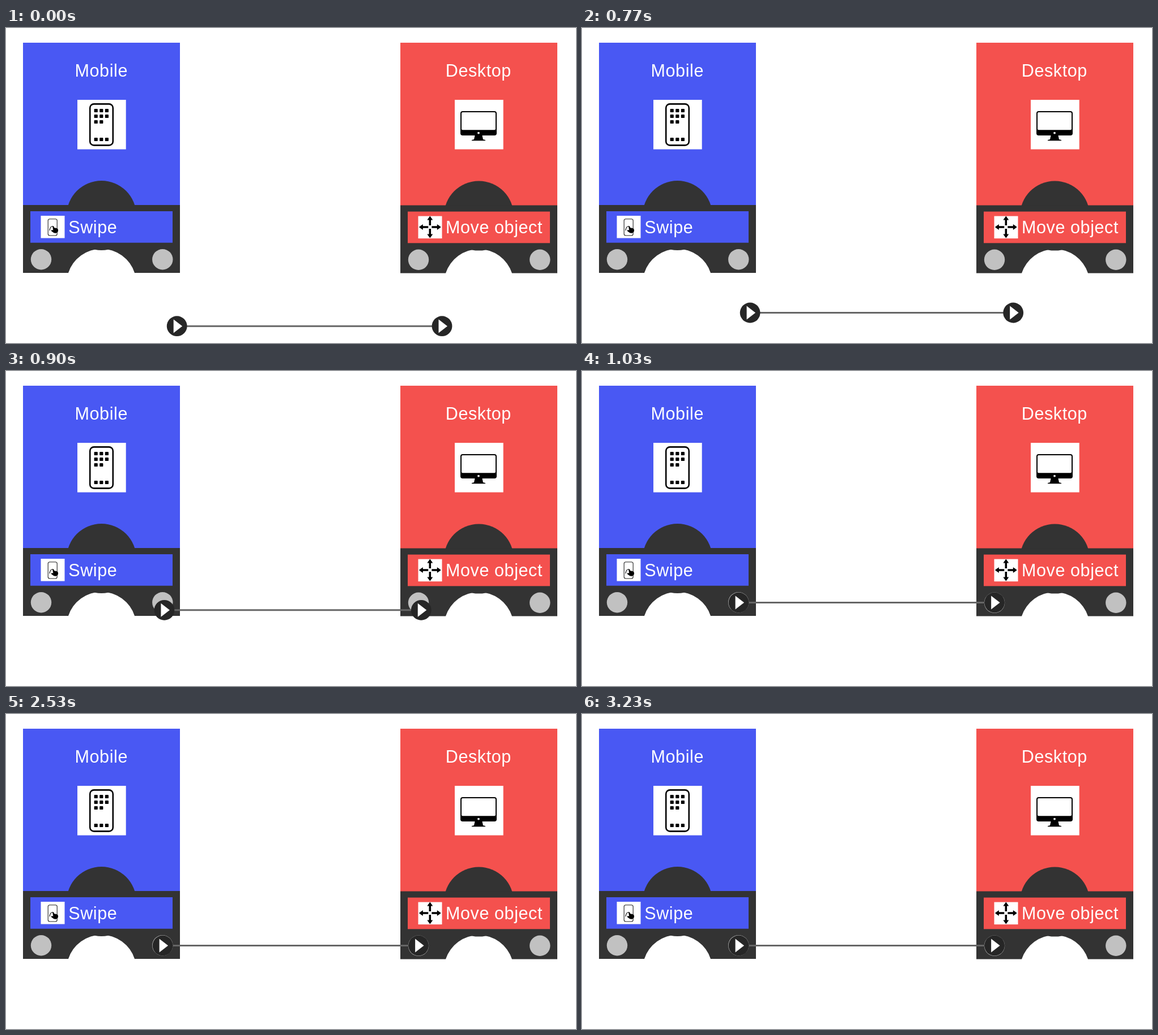
Recreate the animation shown at these times as an HTML page. Size 1006 by 557 pixels, loop 3.33 s.

```html
<!DOCTYPE html>
<html lang="en">
<head>
<meta charset="utf-8">
<title>Connected cards</title>
<style>
  html, body { margin: 0; width: 100%; height: 100%; overflow: hidden; background: #fff; }
  svg { display: block; width: 100%; height: 100%; }
  text { font: 30.5px "Liberation Sans", Arial, sans-serif; letter-spacing: .6px; fill: #fff; }
</style>
</head>
<body>
<svg viewBox="0 0 1006 557">
  <defs>
    <g id="base">
      <circle cx="168.5" cy="331.5" r="61.5" fill="#333"/>
      <path d="M30 313H307V433H227A61.5 61.5 0 0 0 110 433H30Z" fill="#333"/>
      <rect x="43" y="324" width="251" height="55.7" fill="currentColor"/>
      <rect x="61.5" y="332" width="42" height="39.5" fill="#fff"/>
      <g fill="#c1c1c1">
        <circle cx="62" cy="409.2" r="18.2"/>
        <circle cx="276.3" cy="409.2" r="18.2"/>
      </g>
    </g>
    <g id="top">
      <rect x="30" y="26" width="277" height="288" fill="currentColor"/>
      <rect x="126" y="127" width="85.7" height="87.5" fill="#fff"/>
    </g>
    <path id="arrow" d="M3 -1.8H12.5V-5L19.5 0L12.5 5V1.8H3Z"/>
    <g id="node">
      <circle r="17.9" fill="#262626"/>
      <path d="M-6 -12L9.5 0L-6 12Z" fill="#fff"/>
    </g>
  </defs>

  <g color="#4958f3">
    <use href="#top"/>
    <use href="#base"/>
  </g>
  <g color="#f4514e" transform="translate(666 0)">
    <use href="#top"/>
    <use href="#base" y=".6"/>
  </g>

  <text x="121.5" y="86.3">Mobile</text>
  <text x="775.8" y="86.3">Desktop</text>
  <text x="110.2" y="363.3">Swipe</text>
  <text x="776" y="363.3">Move object</text>

  <!-- Phone -->
  <rect x="148.2" y="134.4" width="40.6" height="73" rx="7" fill="none" stroke="#000" stroke-width="2.6"/>
  <g id="apps"></g>

  <!-- Monitor -->
  <rect x="802" y="147" width="64" height="43" rx="4"/>
  <rect x="804" y="149" width="60" height="31.3" rx="2" fill="#fff"/>
  <circle cx="834" cy="185.6" r="1.9" fill="#fff"/>
  <path d="M827.5 190H840.5L842 197L846 198V199.3H822V198L826 197Z"/>

  <!-- Swiping hand -->
  <rect x="74.2" y="337.7" width="16" height="29.3" rx="3" fill="none" stroke="#222" stroke-width="1.1"/>
  <path d="M77 358C77.5 353 80 350 82 351" fill="none" stroke="#000" stroke-width="1.1"/>
  <path d="M82 350.2Q83.3 349.3 84.2 351L85.3 353.2L89.5 354Q92.5 355 92 359Q91 362.7 87 362.7Q84 362.5 79.5 358.4Q80.3 356.6 83.3 357.5Z"/>

  <!-- Four-way arrows -->
  <g transform="translate(748.3 352)">
    <use href="#arrow"/>
    <use href="#arrow" transform="rotate(90)"/>
    <use href="#arrow" transform="rotate(180)"/>
    <use href="#arrow" transform="rotate(270)"/>
  </g>

  <line id="link" stroke="#666" stroke-width="3"/>
  <use id="left" href="#node"/>
  <use id="right" href="#node"/>
</svg>
<script>
const LOOP = 3330, FRAME = 1000 / 30, START = 745, DURATION = 300;
const byId = id => document.getElementById(id);
const [link, left, right] = ['link', 'left', 'right'].map(byId);

const apps = [[146, 3], [156, 3], [166, 2], [197, 3]];
byId('apps').innerHTML = apps.map(([y, count]) =>
  Array.from({ length: count }, (_, i) =>
    `<rect x="${155.6 + i * 9.6}" y="${y - 3.1}" width="6.2" height="6.2" rx="1.2"/>`
  ).join('')).join('');

const mix = (from, to, k) => from + (to - from) * k;

function render(now) {
  // The motion advances on a 30 fps beat.
  const time = Math.floor((now % LOOP + 4) / FRAME) * FRAME;
  const progress = Math.min(1, Math.max(0, (time - START) / DURATION));
  const eased = 1 - (1 - progress) ** 3;
  const y = mix(527.2, 409.5, eased);
  const x1 = mix(301.7, 276.6, eased);
  const x2 = mix(769.5, 728.1, eased);
  left.setAttribute('transform', `translate(${x1} ${y})`);
  right.setAttribute('transform', `translate(${x2} ${y})`);
  Object.entries({ x1, y1: y, x2, y2: y }).forEach(([key, value]) => link.setAttribute(key, value));
}

function tick() {
  render(performance.now());
  requestAnimationFrame(tick);
}
tick();
</script>
</body>
</html>
```
